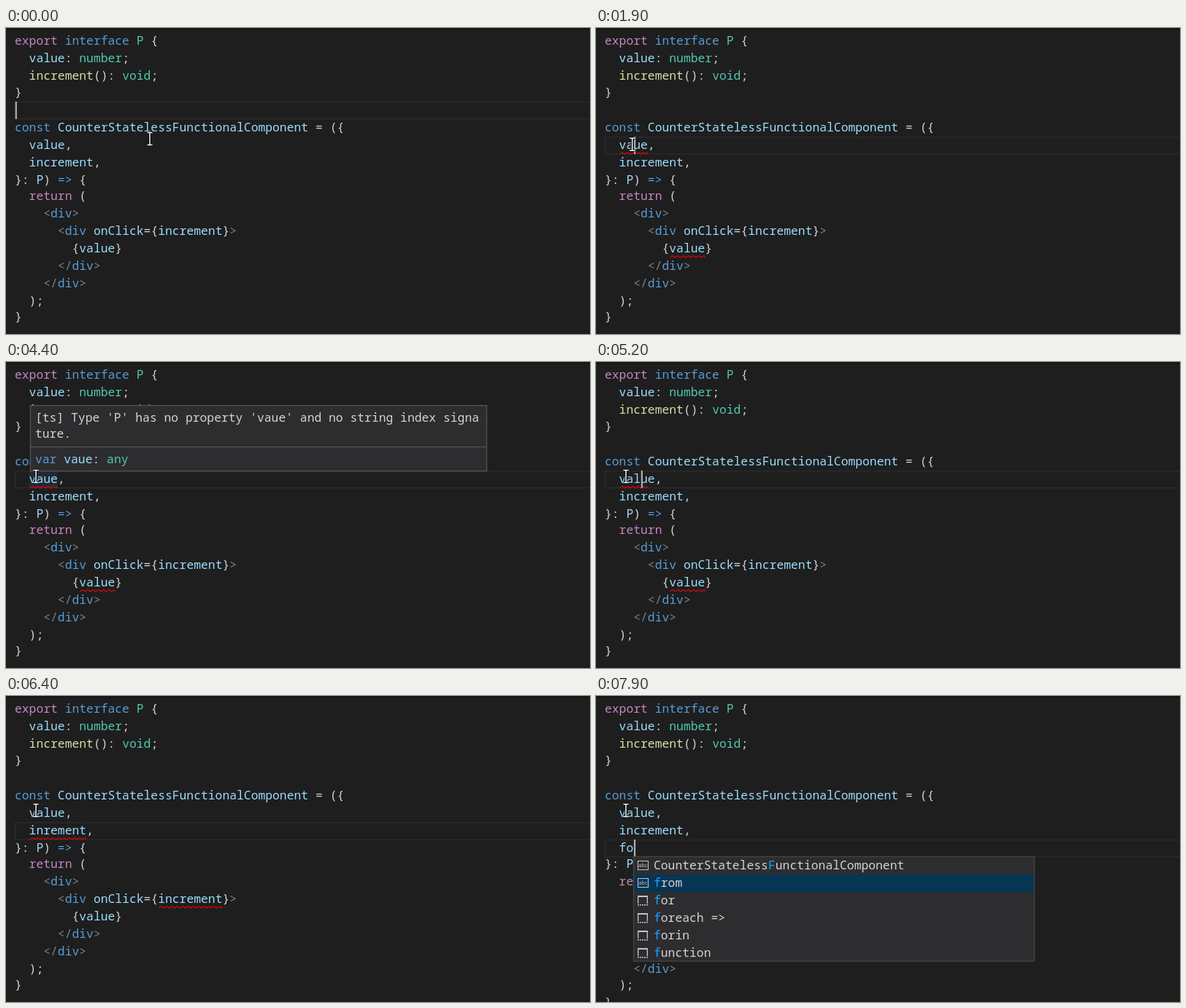
These frames come from a looping animation (800x420 px, 8 s). An HTML page with a canvas:

```html
<!DOCTYPE html>
<html lang="en">
<head>
<meta charset="utf-8">
<title>Editor type checking</title>
<style>
html, body { margin: 0; width: 800px; height: 420px; overflow: hidden; background: #1e1e1e; }
canvas { display: block; }
</style>
</head>
<body>
<canvas id="stage" width="800" height="420"></canvas>
<script>
const ctx = document.getElementById('stage').getContext('2d');
const LOOP = 8000, PITCH = 9.81, LEFT = 12;
const FONT = '"Noto Sans Mono", "DejaVu Sans Mono", monospace';
const COLORS = {
  k: '#c586c0', b: '#569cd6', t: '#4ec9b0', v: '#9cdcfe', f: '#dcdcaa',
  w: '#d4d4d4', g: '#808080', m: '#18a3ff'
};
const WRITE = '#083d5a', READ = '#474747', HOVER = '#202a35';

// time, line, column
const CARET = [
  [0, 4, 0], [200, 5, 0], [300, 5, 5], [500, 6, 5], [900, 6, 4], [5200, 6, 5],
  [5600, 7, 5], [5900, 7, 4], [6900, 7, 5], [7700, 8, 2], [7800, 8, 3], [7900, 8, 4]
];

const SUGGESTIONS = [
  '~wCounterStateless~mF~wunctionalComponent', '~mf~wrom', '~mf~wor',
  '~mf~woreach =>', '~mf~worin', '~mf~wunction'
];

const within = (t, from, to) => t >= from && t < to;
const colX = col => LEFT + col * PITCH;
// vertical centre of a line, snapped to whole pixels
const midY = i => 18 + 24 * i - (i > 2) - 2 * (i > 8) - 2 * (i > 15);

function rect(x, y, w, h, color) {
  ctx.fillStyle = color;
  ctx.fillRect(x, y, w, h);
}

function frame(x, y, w, h, color, width = 1) {
  ctx.strokeStyle = color;
  ctx.lineWidth = width;
  ctx.strokeRect(x, y, w, h);
}

// "~c" switches to colour c
function write(markup, x, mid) {
  ctx.font = '16.35px ' + FONT;
  for (const part of markup.split('~').slice(1)) {
    const text = part.slice(1);
    ctx.fillStyle = COLORS[part[0]];
    ctx.fillText(text, x, mid + 5);
    x += text.length * PITCH;
  }
}

function codeLines(t) {
  const value = within(t, 900, 5200) ? 'vaue' : 'value';
  const increment = within(t, 5900, 6900) ? 'inrement' : 'increment';
  const lines = [
    '~kexport ~binterface ~tP ~w{',
    '~v  value~w: ~tnumber~w;',
    '~f  increment~w(): ~tvoid~w;',
    '~w}',
    '',
    '~bconst ~vCounterStatelessFunctionalComponent~w = ({',
    `~v  ${value}~w,`,
    `~v  ${increment}~w,`,
    '~w}: ~vP~w) ~b=>~w {',
    '~k  return~w (',
    '~g    <~bdiv~g>',
    '~g      <~bdiv ~vonClick~w={~vincrement~w}~g>',
    '~w        {~vvalue~w}',
    '~g      </~bdiv~g>',
    '~g    </~bdiv~g>',
    '~w  );',
    '~w}'
  ];
  if (t >= 7700) lines.splice(8, 0, '~v  ' + (t >= 7900 ? 'fo' : t >= 7800 ? 'f' : ''));
  return lines;
}

function highlight(line, col, length, color) {
  rect(colX(col), midY(line) - 12, length * PITCH, 24, color);
}

function squiggle(line, col, length) {
  const start = colX(col) + 1, end = start + length * PITCH - 1, y = midY(line) + 12;
  ctx.beginPath();
  ctx.moveTo(start, y);
  for (let x = start, up = true; x < end; up = !up) {
    x = Math.min(x + 3.6, end);
    ctx.lineTo(x, up ? y - 2.4 : y);
  }
  ctx.strokeStyle = '#f00000';
  ctx.lineWidth = 1.2;
  ctx.stroke();
}

function drawMarks(t) {
  if (within(t, 700, 900)) {
    highlight(1, 2, 5, WRITE);
    highlight(6, 2, 5, WRITE);
    highlight(12, 9, 5, READ);
  }
  if (within(t, 2300, 5200)) highlight(6, 2, 4, HOVER);
  if (within(t, 5800, 5900)) {
    highlight(2, 2, 9, WRITE);
    highlight(7, 2, 9, WRITE);
    highlight(11, 20, 9, READ);
  }
}

function drawErrors(t) {
  if (within(t, 1200, 5600)) {
    squiggle(6, 2, t < 5300 ? 4 : 5);
    squiggle(12, 9, 5);
  }
  if (within(t, 6300, 7300)) {
    squiggle(7, 2, t < 6900 ? 8 : 9);
    squiggle(11, 20, 9);
  }
}

function drawTooltip() {
  rect(33, 60, 626, 90, '#2d2d30');
  frame(33.5, 59.7, 625, 90, '#555', 1.3);
  rect(34, 116, 624, 1.2, '#555');
  write("~w[ts] Type 'P' has no property 'vaue' and no string index signa", 40, 77);
  write('~wture.', 40, 99);
  write('~bvar ~vvaue~w: ~tany', 40, 134);
}

function drawIcon(y, isWord) {
  if (isWord) {
    frame(57.5, y - 6.5, 14, 12, '#c5c5c5');
    ctx.font = '7px ' + FONT;
    ctx.fillStyle = '#c5c5c5';
    ctx.fillText('abc', 58.3, y + 2);
    return;
  }
  rect(57, y - 7, 14, 2, '#c5c5c5');
  rect(57, y - 7, 1.3, 11, '#c5c5c5');
  rect(69.7, y - 7, 1.3, 11, '#c5c5c5');
  for (let x = 57; x < 71; x += 3) rect(x, y + 5, 2, 1.5, '#c5c5c5');
}

function drawSuggestions() {
  rect(51, 220, 550, 144, '#2d2d30');
  rect(52, 245, 548, 24, '#073655');
  frame(51.5, 220.5, 549, 143.5, '#454545', 1.3);
  SUGGESTIONS.forEach((item, i) => {
    const y = 233 + 24 * i;
    drawIcon(y, i < 2);
    write(item, 79, y);
  });
}

function drawPointer(t) {
  const step = Math.min(7, Math.max(0, Math.floor((t - 1300) / 100))) / 7;
  const u = step * step * (3 - 2 * step);
  const x = 197 - 156 * u, y = 152 + 5 * u + 18 * Math.sin(Math.PI * u);
  ctx.beginPath();
  for (const s of [-1, 1]) {
    ctx.moveTo(x - 3.5, y + 8.5 * s);
    ctx.lineTo(x + 3.5, y + 8.5 * s);
  }
  ctx.moveTo(x, y - 8.5);
  ctx.lineTo(x, y + 8.5);
  for (const [color, width] of [['#000', 3.6], ['#fff', 1.5]]) {
    ctx.strokeStyle = color;
    ctx.lineWidth = width;
    ctx.stroke();
  }
}

function draw(t) {
  rect(0, 0, 800, 420, '#1e1e1e');
  const shade = ctx.createLinearGradient(0, 0, 0, 4);
  shade.addColorStop(0, 'rgba(0,0,0,.4)');
  shade.addColorStop(1, 'rgba(0,0,0,0)');
  rect(0, 0, 800, 4, shade);

  const [moved, line, col] = CARET.filter(c => c[0] <= t).pop();
  frame(12.5, midY(line) - 11.2, 800, 23, '#292929', 1.6);
  drawMarks(t);
  codeLines(t).forEach((text, i) => write(text, LEFT, midY(i)));
  drawErrors(t);
  if (Math.floor((t - moved) / 500) % 2 === 0) {
    rect(colX(col) + 0.7, midY(line) - 12, 2.2, 24, '#aeafad');
  }
  if (within(t, 2300, 5200)) drawTooltip();
  if (t >= 7900) drawSuggestions();
  drawPointer(t);
}

function tick() {
  draw(performance.now() % LOOP);
  requestAnimationFrame(tick);
}
tick();
</script>
</body>
</html>
```
